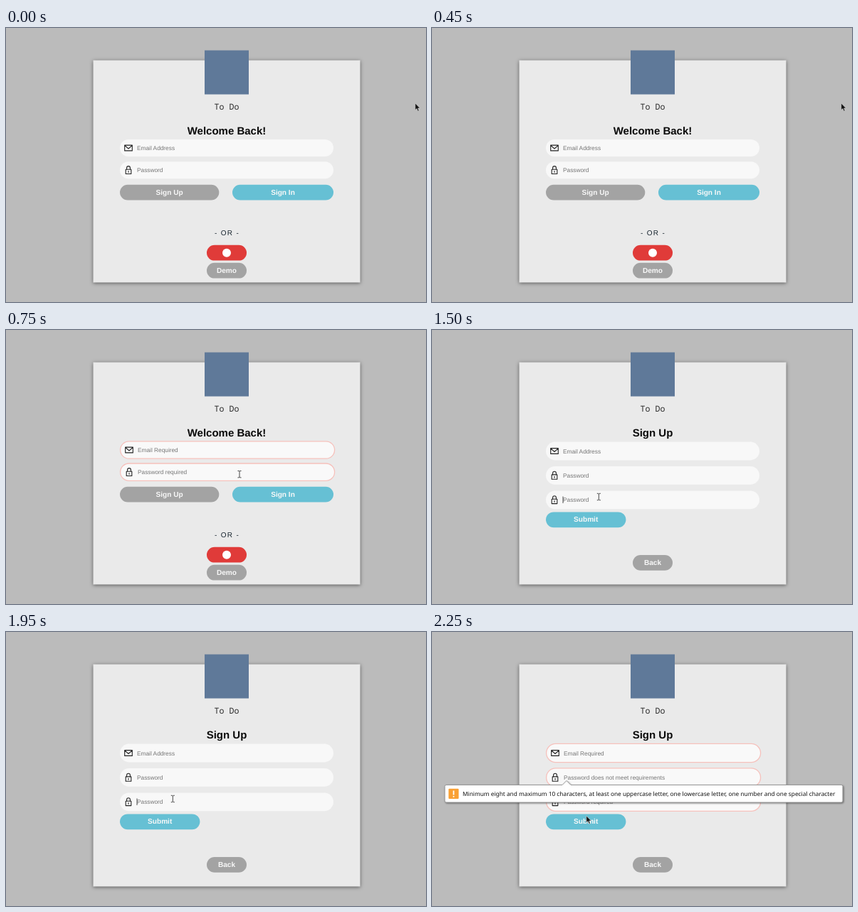
An HTML page that plays this animation: 590x386 px, repeating every 3 s.

```html
<!DOCTYPE html>
<html lang="en">
<head>
<meta charset="utf-8">
<title>Sign-in form</title>
<style>
  html, body { margin: 0; width: 100%; height: 100%; overflow: hidden; background: #bbb; }
  svg { display: block; width: 590px; height: 386px; }
  text { font-family: "Liberation Sans", Arial, sans-serif; text-rendering: geometricPrecision; }
  .mid { text-anchor: middle; }
  .title { font-size: 15px; font-weight: bold; fill: #0a0a0a; }
  .label { font-size: 10.1px; font-weight: bold; fill: #f8f8f8; }
  .hint { font-size: 8.3px; fill: #757575; }
  .brand { font: 11.6px "Noto Sans Mono", monospace; fill: #2c2c2c; }
  .or { font-size: 10px; letter-spacing: 1.3px; fill: #15222c; }
  .tip { font: 8.31px "Noto Sans", sans-serif; fill: #111; }
  .icon { fill: none; stroke: #222; stroke-width: 1.1; stroke-linejoin: round; }
  .card { filter: drop-shadow(0 1.5px 2.5px #0008); }
  .bubble { fill: #fff; stroke: #989898; filter: drop-shadow(1.5px 1.5px 1px #0007); }
</style>
</head>
<body>
<svg viewBox="0 0 590 386">
  <rect width="590" height="386" fill="#bbb"/>
  <rect class="card" x="122.5" y="45.5" width="375" height="313" fill="#eaeaea"/>
  <rect x="279" y="31.5" width="62" height="62" fill="#5f7999"/>
  <text class="brand mid" x="310" y="115">To Do</text>
  <g id="scene"></g>
</svg>
<script>
const GRAY = '#a3a3a3', BLUE = '#66c0d4', RED = '#e03b39';

const text = (kind, x, y, str) => `<text class="${kind}" x="${x}" y="${y}">${str}</text>`;
const pill = (x, y, w, h, style) =>
  `<rect x="${x}" y="${y}" width="${w}" height="${h}" rx="${h / 2}" ${style}/>`;
const title = str => text('title mid', 310, 149.5, str);
const button = (x, y, w, color, str) =>
  pill(x, y, w, 21.8, `fill="${color}"`) + text('label mid', x + w / 2, y + 14, str);

const icons = {
  mail: '<path d="M-5.3-3.9H5.3V3.9H-5.3ZM-5.3-3.7 0 1 5.3-3.7"/>',
  lock: '<path d="M-3.8-1H3.8V5.3H-3.8ZM-2.4-1V-3.2a2.4 2.4 0 0 1 4.8 0V-1M0 1V3.5"/>'
};

// One input row centred on cy; rows in error get a pink outline and shift right.
function field(icon, cy, h, hint, error) {
  const shift = error ? 1 : 0;
  const box = error
    ? pill(160.6, cy - h / 2 - .2, 301, h + .4, 'fill="#f9f9f9" stroke="#f6c1bc" stroke-width="1.3"')
    : pill(160, cy - h / 2, 300, h, 'fill="#f8f8f8"');
  return box + `<g class="icon" transform="translate(${172 + shift} ${cy})">${icons[icon]}</g>`
    + text('hint', 184 + shift, cy + 3, hint);
}

const arrow = (x, y) => `<path transform="translate(${x} ${y})" fill="#111" stroke="#ddd"
  stroke-width=".6" d="M0 0V9.6L2.2 7.6 3.8 11.2 5.4 10.5 3.9 7H6.8Z"/>`;
const beam = (x, y) => `<path transform="translate(${x} ${y})" fill="none" stroke="#444"
  d="M-2.5-4.7H-.8L0-4 .8-4.7H2.5M0-4V4M-2.5 4.7H-.8L0 4 .8 4.7H2.5"/>`;

const signIn = (first, second, error) =>
  title('Welcome Back!')
  + field('mail', 169, 24, first, error) + field('lock', 200.2, 24, second, error)
  + button(160, 220.7, 139.3, GRAY, 'Sign Up') + button(318, 220.7, 142, BLUE, 'Sign In')
  + text('or mid', 310.6, 292, '- OR -')
  + button(282, 305.8, 56, RED, '') + '<circle cx="310" cy="316.7" r="6" fill="#fff"/>'
  + button(282, 330.8, 56, GRAY, 'Demo');

const signUp = (hints, error) =>
  title('Sign Up')
  + hints.map((hint, i) => field(i ? 'lock' : 'mail', 170.5 + 34.4 * i, 25.8, hint, error)).join('')
  + button(160, 256.4, 112.4, BLUE, 'Submit') + button(282, 317, 56, GRAY, 'Back');

const tooltip = `<path class="bubble" d="M20 215.5H183L189 209.5 195 215.5H575q2 0 2 2V238q0 2-2 2H20
  q-2 0-2-2V217.5q0-2 2-2Z"/>
  <rect x="23.3" y="220.8" width="14.2" height="14.2" rx="1" fill="#f9a033"/>
  <path d="M30.4 223.5V229.5M30.4 230.9V232.7" stroke="#fff" stroke-width="1.8"/>`
  + text('tip', 43, 230.8, 'Minimum eight and maximum 10 characters, at least one uppercase letter, '
  + 'one lowercase letter, one number and one special character');

const scenes = [
  signIn('Email Address', 'Password', false) + arrow(574.8, 106),
  signIn('Email Required', 'Password required', true) + beam(328, 203.2),
  signUp(['Email Address', 'Password', 'Password'], false)
    + '<path d="M184 234.5V244" stroke="#222" stroke-width=".8"/>' + beam(234.3, 235),
  signUp(['Email Required', 'Password does not meet requirements', 'Password required'], true)
    + tooltip + arrow(216.8, 259)
];

const stage = document.getElementById('scene');
let shown = -1;
function draw(now) {
  const index = Math.floor(now % 3000 / 750);
  if (index !== shown) stage.innerHTML = scenes[shown = index];
  requestAnimationFrame(draw);
}
draw(performance.now());
</script>
</body>
</html>
```
